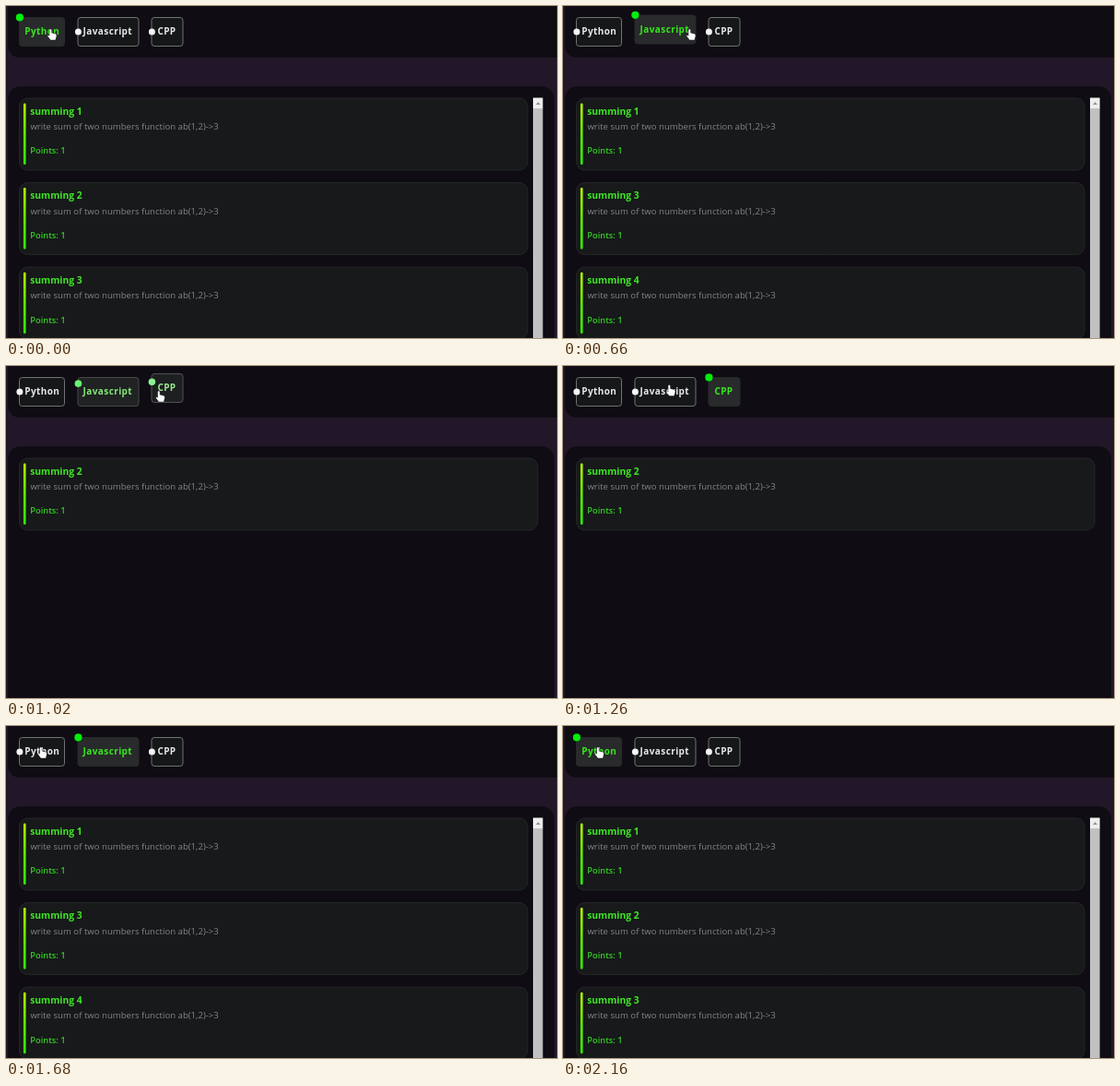
These frames come from a looping animation (598 px wide and 360 px high, 2.22 s). An HTML page with a canvas:

```html
<!DOCTYPE html>
<html lang="en">
<head>
<meta charset="utf-8">
<title>Language tabs</title>
<style>
  html, body { margin: 0; width: 100%; height: 100%; overflow: hidden; background: #221728; }
  canvas { display: block; }
</style>
</head>
<body>
<canvas id="stage" width="598" height="360"></canvas>
<script>
const ctx = document.getElementById('stage').getContext('2d');
const LOOP = 2220, STEP = 60;
const FADE = 150, BOUNCE = 250, LIFT = 7.2;
const FONT = '"Open Sans", "Noto Sans", sans-serif';

const tabs = [
  { name: 'Python', x: 14, w: 50, textX: 20.3, tasks: [1, 2, 3] },
  { name: 'Javascript', x: 77.5, w: 67, textX: 83.6, tasks: [1, 3, 4] },
  { name: 'CPP', x: 157.5, w: 35, textX: 164.4, tasks: [2] }
];

// Each click: time and tab index
const clicks = [[1912 - LOOP, 0], [460, 1], [952, 2], [1430, 1], [1912, 0]];

// Pointer path: time, x, y
const path = [
  [0, 50, 31], [50, 50, 31], [300, 114, 31], [540, 114, 31],
  [660, 139, 31], [840, 167.5, 33], [1080, 167.5, 33], [1260, 117, 26.5],
  [1480, 117, 26.5], [1680, 39.5, 29], [2160, 39.5, 29], [LOOP, 50, 31]
];

const clamp = v => Math.max(0, Math.min(1, v));
const ease = v => { v = clamp(v); return v * v * (3 - 2 * v); };
const mix = (a, b, k) => a + (b - a) * k;
const mixColor = (a, b, k) => `rgb(${a.map((v, i) => Math.round(mix(v, b[i], k)))})`;

function box(x, y, w, h, r, fill, stroke) {
  ctx.beginPath();
  ctx.roundRect(x, y, w, h, r);
  ctx.fillStyle = fill;
  ctx.fill();
  if (stroke) {
    ctx.strokeStyle = stroke;
    ctx.lineWidth = 1;
    ctx.stroke();
  }
}

function text(str, x, y, size, weight, color, spacing = 0) {
  ctx.font = `${weight} ${size}px ${FONT}`;
  ctx.letterSpacing = spacing + 'px';
  ctx.fillStyle = color;
  ctx.fillText(str, x, y);
}

function drawBackground() {
  ctx.fillStyle = '#221728';
  ctx.fillRect(0, 0, 598, 360);
  box(2, -20, 620, 76, 13, '#0f0c13');
  box(2, 87, 593, 300, 14, '#0f0c13');
}

function drawTab(tab, on, lift) {
  const y = 12 - lift;
  box(tab.x + 0.5, y + 0.5, tab.w - 1, 31, 3,
    mixColor([21, 23, 25], [40, 42, 43], on),
    mixColor([112, 115, 115], [40, 42, 43], on));
  text(tab.name, tab.textX, y + 19.4, 10, 700,
    mixColor([232, 232, 232], [54, 232, 28], on), 0.4);
  ctx.beginPath();
  ctx.arc(tab.x + 0.9, y + mix(16, 0.4, on), mix(3.5, 4.1, on), 0, Math.PI * 2);
  ctx.fillStyle = mixColor([245, 245, 245], [0, 238, 10], on);
  ctx.fill();
}

function drawTabs(t, now) {
  const [at, active] = clicks[now];
  const previous = now ? clicks[now - 1][1] : 1;
  const k = ease((t - at) / FADE);
  const phase = clamp((t - at) / BOUNCE) * 2;
  const lift = LIFT * ease(phase < 1 ? phase : 2 - phase);
  tabs.forEach((tab, i) => {
    const on = i === active ? k : i === previous ? 1 - k : 0;
    drawTab(tab, on, i === active ? lift : 0);
  });
}

function drawCard(number, y, w) {
  box(14.5, y + 0.5, w, 78, 9, '#17191a', '#242728');
  const bar = ctx.createLinearGradient(0, y + 6, 0, y + 72);
  bar.addColorStop(0, '#b4ec00');
  bar.addColorStop(0.5, '#62ea00');
  bar.addColorStop(1, '#2fea00');
  box(18.9, y + 6, 2.7, 66.5, 1.2, bar);
  text('summing ' + number, 26.2, y + 18.3, 10.3, 700, '#3ee624');
  text('write sum of two numbers function ab(1,2)->3', 26.4, y + 34.7, 9.6, 400, '#83868a');
  text('Points: 1', 26.3, y + 60.9, 9.3, 600, '#36cd27');
}

function drawScrollbar() {
  ctx.fillStyle = '#eeeeee';
  ctx.fillRect(572, 99.5, 10.6, 12);
  ctx.fillStyle = '#c1c1c1';
  ctx.fillRect(572, 111, 10.6, 249);
  ctx.beginPath();
  ctx.moveTo(575, 107);
  ctx.lineTo(577.5, 104);
  ctx.lineTo(580, 107);
  ctx.fillStyle = '#929292';
  ctx.fill();
}

function drawList(tasks) {
  const scrolls = tasks.length > 1;
  tasks.forEach((n, i) => drawCard(n, 99.5 + i * 91.6, scrolls ? 551.5 : 562.5));
  if (scrolls) drawScrollbar();
}

function drawPointer(t) {
  const i = path.findIndex(p => p[0] > t);
  const a = path[i - 1], b = path[i];
  const k = (t - a[0]) / (b[0] - a[0]);
  ctx.save();
  ctx.translate(mix(a[1], b[1], k), mix(a[2], b[2], k));
  ctx.beginPath();
  ctx.moveTo(-2.7, 1.5);
  ctx.lineTo(-2.7, -5);
  ctx.quadraticCurveTo(-1.7, -7, -0.7, -5);
  ctx.lineTo(-0.7, -1.8);
  ctx.lineTo(3.5, -0.8);
  ctx.quadraticCurveTo(5, -0.2, 4.7, 1.5);
  ctx.lineTo(3.6, 5.8);
  ctx.lineTo(-1.6, 5.8);
  ctx.lineTo(-4.8, 1.5);
  ctx.quadraticCurveTo(-4.6, -0.2, -2.7, 1.5);
  ctx.closePath();
  ctx.lineJoin = 'round';
  ctx.lineWidth = 1;
  ctx.strokeStyle = '#222';
  ctx.stroke();
  ctx.fillStyle = '#fafafa';
  ctx.fill();
  ctx.restore();
}

function frame() {
  const t = Math.floor((performance.now() % LOOP) / STEP) * STEP;
  const now = clicks.findLastIndex(c => c[0] <= t);
  drawBackground();
  drawTabs(t, now);
  drawList(tabs[clicks[now][1]].tasks);
  drawPointer(t);
  requestAnimationFrame(frame);
}
frame();
</script>
</body>
</html>
```
